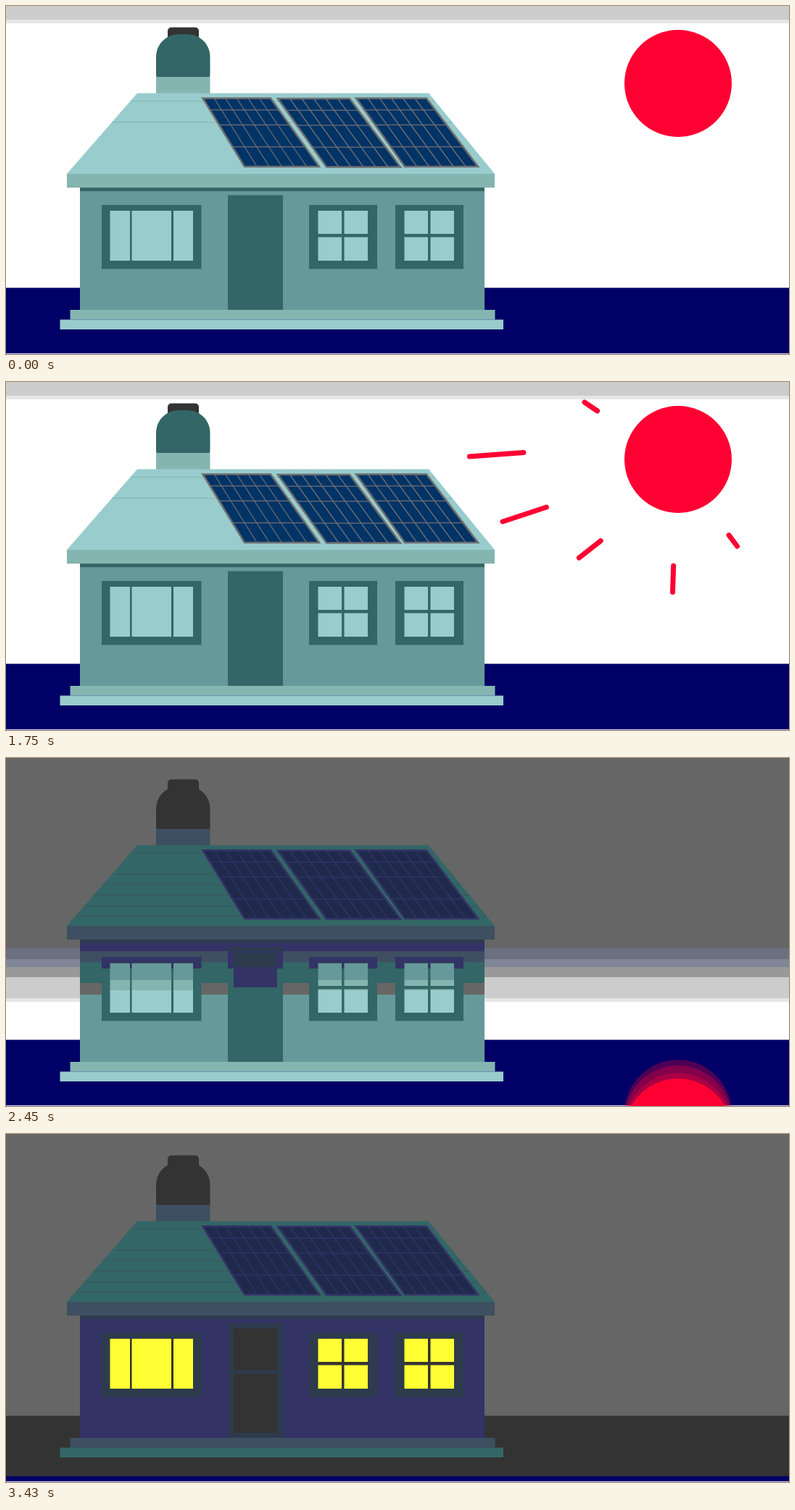
Recreate the animation shown at these times as an HTML page. Size 1080 by 481 pixels, loop 4.27 s.

```html
<!DOCTYPE html>
<html lang="en">
<head>
<meta charset="utf-8">
<title>Solar house, day to night</title>
<style>
  html, body { margin: 0; width: 100%; height: 100%; overflow: hidden; background: #fff; }
  svg { display: block; width: 100vw; height: 100vh; }
  #rays { stroke: #ff0033; stroke-width: 7; stroke-linecap: round; }
  #sun { fill: #ff0033; }
</style>
</head>
<body>
<svg viewBox="0 0 1080 481" preserveAspectRatio="none">
  <defs id="defs"></defs>
  <rect width="1080" height="481" fill="url(#sky)"/>
  <rect y="389.5" width="1080" height="91.5" fill="url(#ground)"/>
  <rect y="480" width="1080" height="1" fill="#ccccff"/>
  <g id="rays"></g>
  <g id="sun"></g>
  <g id="house">
    <rect x="207" y="97" width="74.5" height="25" fill="url(#eave)"/>
    <rect x="223" y="29.5" width="43" height="18" rx="5" fill="#333"/>
    <path d="M207 96V71C207 52 221 39 240 39H249C267 39 281.500 52 281.500 71V96Q281.500 98 279.500 98H209Q207 98 207 96Z" fill="url(#deep)"/>
    <path d="M181 120.500H583L674 232H84Z" fill="url(#roof)"/>
    <g id="tiles"></g>
    <g id="panels"></g>
    <rect x="102" y="250" width="558" height="170" fill="url(#wall)"/>
    <rect x="102" y="250" width="558" height="6" fill="url(#trim)"/>
    <rect x="84" y="232" width="590" height="19" fill="url(#eave)"/>
    <rect x="306" y="261.500" width="76" height="158.500" fill="url(#trim)"/>
    <rect x="314" y="269" width="60" height="57" fill="url(#deep)"/>
    <rect x="314" y="331" width="60" height="82" fill="url(#deep)"/>
    <g id="windows"></g>
    <g id="lights" opacity="0"></g>
    <rect x="88.500" y="420" width="586" height="13.500" fill="url(#eave)"/>
    <rect x="74.500" y="433.500" width="611.500" height="13.500" fill="url(#roof)"/>
  </g>
</svg>
<script>
const $ = id => document.getElementById(id);

function add(parent, tag, attrs) {
  const el = document.createElementNS('http://www.w3.org/2000/svg', tag);
  for (const key in attrs) el.setAttribute(key, attrs[key]);
  return parent.appendChild(el);
}

// Each material runs from its night colour to its day colour in hard bands,
// the numbers being the distance of each border below the edge of darkness.
const materials = {
  sky: ['#666666', 0, '#6b7080', 15, '#7f8695', 26, '#999999', 40, '#cccccc', 69, '#e6e6e6', 74, '#ffffff'],
  ground: ['#333333', 0, '#000066'],
  roof: ['#336666', 21, '#669999', 44, '#84b5b1', 58, '#99cccc'],
  eave: ['#3d4f60', 19, '#336666', 40, '#669999', 67, '#84b5b1'],
  wall: ['#333366', 4, '#3d4f60', 19, '#336666', 48, '#666666', 64, '#669999'],
  trim: ['#2d3b4d', 4, '#333366', 28, '#336666'],
  deep: ['#333333', -7, '#2d3b4d', 26, '#333366', 54, '#336666'],
  bars: ['#333366', 28, '#336666'],
  cell: ['#1f294c', 30, '#003366'],
  grid: ['#333366', 30, '#6e6e70'],
  tile: ['#3a555c', 21, '#84b5b1'],
  tileNight: ['#3a555c', 21, '#669999', 44, '#84b5b1', 58, '#99cccc']
};

const gradients = Object.entries(materials).map(([id, bands]) => {
  const gradient = add($('defs'), 'linearGradient',
    { id, gradientUnits: 'userSpaceOnUse', x1: 0, y1: -10, x2: 0, y2: 90 });
  for (let i = 1; i < bands.length; i += 2) {
    const offset = (bands[i] + 10) / 100;
    add(gradient, 'stop', { offset, 'stop-color': bands[i - 1] });
    add(gradient, 'stop', { offset, 'stop-color': bands[i + 1] });
  }
  return gradient;
});

for (const y of [131.5, 160.5, 175, 189.5, 204.5, 218.5]) {
  const f = (y - 120.5) / 111.5;
  add($('tiles'), 'path', {
    d: `M${181 - 97 * f} ${y}H${583 + 91 * f}`,
    stroke: `url(#${y < 165 ? 'tile' : 'tileNight'})`
  });
}

// Panel: left and right x at the top, left and right x at the bottom, top y
function panel(tl, tr, bl, br, top) {
  const mix = (a, b, f) => a + (b - a) * f;
  const bottom = top + 94.5;
  let d = '';
  for (let i = 1; i < 6; i++) {
    d += `M${mix(tl, tr, i / 6)} ${top}L${mix(bl, br, i / 6)} ${bottom}`;
  }
  for (const f of [0.17, 0.39, 0.71]) {
    d += `M${mix(tl, bl, f)} ${mix(top, bottom, f)}H${mix(tr, br, f)}`;
  }
  const outline = `M${tl} ${top}H${tr}L${br} ${bottom}H${bl}Z`;
  add($('panels'), 'path', { d: outline, fill: 'url(#cell)' });
  add($('panels'), 'path', { d, stroke: 'url(#grid)', 'stroke-width': 1.3 });
  add($('panels'), 'path', { d: outline, fill: 'none', stroke: 'url(#grid)', 'stroke-width': 2.6 });
}
panel(271.5, 365, 329, 432, 127.5);
panel(375, 474, 442, 544, 128);
panel(483, 580, 550, 651, 127.5);

function pane(x, y, width, height) {
  add($('windows'), 'rect', { x, y, width, height, fill: 'url(#roof)' });
  add($('lights'), 'rect', { x, y, width, height, fill: '#ffff33' });
}

function frame(x, width, glassX, glassWidth) {
  const glass = { x: glassX, y: 283, width: glassWidth, height: 69 };
  add($('windows'), 'rect', { x, y: 275, width, height: 88.5, fill: 'url(#trim)' });
  add($('windows'), 'rect', { ...glass, fill: 'url(#bars)' });
  add($('lights'), 'rect', { ...glass, fill: '#333333' });
}

frame(132, 137.5, 143.5, 114.5);
for (const [x, w] of [[143.5, 27.5], [173.5, 54.5], [231, 27]]) pane(x, 283, w, 69);

for (const x of [418, 537]) {
  frame(x, 94, x + 12.5, 68.5);
  for (const dx of [12.5, 48.5]) {
    pane(x + dx, 283, 32.5, 32);
    pane(x + dx, 319.5, 32.5, 32.5);
  }
}

// Rays: inner x, y, outer x, y
const rays = [
  [842, 58, 798, 28],
  [825.5, 89.5, 639.5, 103],
  [836, 143, 685, 193],
  [865, 184, 790.5, 243],
  [922.5, 199, 919.5, 290.5],
  [980, 188.5, 1008.5, 227]
].map(ends => ({ ends, line: add($('rays'), 'line', {}) }));

const ghosts = [-1, -0.4, 0.4, 1].map(shift =>
  ({ shift, disc: add($('sun'), 'circle', { cx: 927, r: 74, opacity: 0.3 }) }));
const core = add($('sun'), 'path', {});

const clamp = (v, lo, hi) => Math.min(hi, Math.max(lo, v));

function drawRays(step) {
  const head = clamp(step / 7.5, 0, 1);
  const tail = clamp((step - 5.5) / 7.5, 0, 1);
  $('rays').style.display = head > tail ? '' : 'none';
  for (const { ends: [x, y, ox, oy], line } of rays) {
    line.setAttribute('x1', x + (ox - x) * tail);
    line.setAttribute('y1', y + (oy - y) * tail);
    line.setAttribute('x2', x + (ox - x) * head);
    line.setAttribute('y2', y + (oy - y) * head);
  }
}

// While falling, the sun is smeared: ghost discs around their common lens
function drawSun(fall) {
  const y = 107 + 66.2 * fall;
  const blur = fall > 0 ? 13 : 0;
  const half = Math.sqrt(74 * 74 - blur * blur);
  const arc = 'A74 74 0 0 1';
  core.setAttribute('d', `M${927 - half} ${y}${arc} ${927 + half} ${y}${arc} ${927 - half} ${y}Z`);
  for (const { shift, disc } of ghosts) {
    disc.setAttribute('cy', y + shift * blur);
    disc.style.display = blur ? '' : 'none';
  }
}

function draw(step) {
  const fall = clamp(step - 29, 0, 10);
  const edge = Math.floor(-50 + 52.3 * fall);
  for (const g of gradients) g.setAttribute('gradientTransform', `translate(0 ${edge})`);
  drawRays(step < 15 ? step : step - 15);
  drawSun(fall);
  $('lights').setAttribute('opacity', clamp((step - 42) / 7, 0, 1));
}

const STEP = 70, LOOP = 4270;
const start = performance.now();
let shown = -1;
function tick() {
  const step = Math.floor((performance.now() - start) % LOOP / STEP);
  if (step !== shown) draw(shown = step);
  requestAnimationFrame(tick);
}
tick();
</script>
</body>
</html>
```
